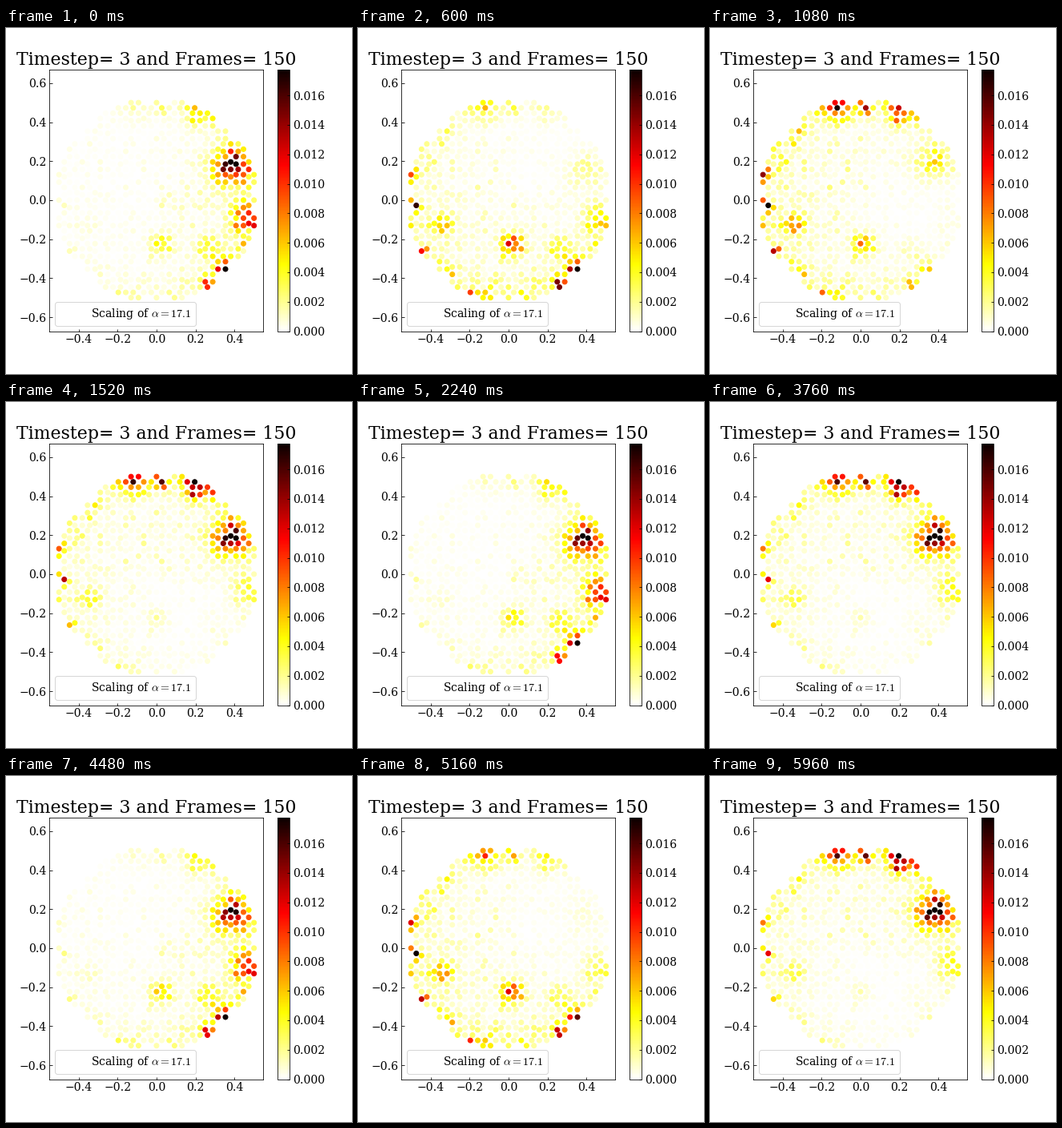
These frames come from a looping animation (432x432 px, 6 s). A matplotlib script:

```python
import numpy as np
import matplotlib.pyplot as plt
from matplotlib.animation import FuncAnimation

SIZE, FRAMES, STEP = 432, 150, 40
PERIOD = 2200          # ms for one trip around the rim
VMAX = 0.01775
CX, CY, SCALE = 187.92, 214.92, 243.49   # stage position of the disc

plt.rcParams.update({
    "font.family": "DejaVu Serif", "font.size": 14, "mathtext.fontset": "cm",
    "xtick.direction": "in", "ytick.direction": "in",
})


def octagonal_tiling():
    """Vertices of the eightfold tiling, cut and projected from Z^4."""
    r = np.arange(-8, 9)
    n = np.stack(np.meshgrid(r, r, r, r, indexing="ij"), -1).reshape(-1, 4)
    k = np.arange(4) * np.pi / 4
    axes = np.column_stack([np.cos(k), np.sin(k)])
    window = np.column_stack([np.cos(3 * k), np.sin(3 * k)])
    inside = np.abs(n @ window @ axes.T).max(1) < (1 + np.sqrt(2)) / 2
    p = n[inside] @ axes / (12 + 20 / np.sqrt(2))
    rim = (np.abs(p @ axes.T).max(1) < 0.5001) & (np.hypot(*p.T) < 0.518)
    return p[rim]


# Places where the wave piles up: x, y, spread, peak in thousandths
TRAPS = [
    (0.38, 0.18, 0.060, 24), (0.45, -0.09, 0.050, 10),
    (0.35, -0.35, 0.030, 22), (0.27, -0.42, 0.025, 16),
    (0.26, -0.24, 0.040, 7), (0.02, -0.23, 0.040, 13),
    (-0.33, -0.12, 0.035, 13), (-0.48, -0.03, 0.020, 24),
    (-0.50, 0.13, 0.015, 18), (-0.12, 0.48, 0.045, 14),
    (0.02, 0.48, 0.025, 20), (0.21, 0.46, 0.045, 18),
]


def split_density(xy):
    """Peak density of the inner sites and of the rim with its traps."""
    rng = np.random.default_rng(3)
    x, y = xy.T
    size = len(xy)
    depth = np.clip(0.5 - np.hypot(x, y), 0, None)
    bulk = 0.2 + rng.exponential(0.45, size)
    edge = (0.8 + rng.exponential(2.4, size)) * np.exp(-(depth / 0.06) ** 1.5)
    rough = rng.uniform(0.5, 1.1, size)
    for u, v, s, amp in TRAPS:
        edge += amp * rough * np.exp(-((x - u) ** 2 + (y - v) ** 2) / (2 * s * s))
    return bulk / 1000, edge / 1000


def arrival(xy):
    """Time in ms at which the clockwise wave peaks; it slows at the right."""
    turn = -np.arctan2(xy[:, 1], xy[:, 0])
    return PERIOD * turn / (2 * np.pi) - 90 + 200 * np.sin(turn)


sites = octagonal_tiling()
bulk, edge = split_density(sites)
when = arrival(sites)


def density(t):
    wave = np.cos(np.pi * (t - when) / PERIOD) ** 2
    return bulk * (0.25 + 0.75 * wave) + edge * (0.03 + 0.97 * wave)


def box(left, top, right, bottom):
    return [left / SIZE, 1 - bottom / SIZE,
            (right - left) / SIZE, (bottom - top) / SIZE]


LEFT, TOP, RIGHT, BOTTOM = 54, 51.84, 321.4, 378.6

fig = plt.figure(figsize=(6, 6), dpi=72, facecolor="white")
ax = fig.add_axes(box(LEFT, TOP, RIGHT, BOTTOM))
ax.set_xlim((LEFT - CX) / SCALE, (RIGHT - CX) / SCALE)
ax.set_ylim((CY - BOTTOM) / SCALE, (CY - TOP) / SCALE)
ax.set_xticks([-0.4, -0.2, 0, 0.2, 0.4])
ax.set_yticks([-0.6, -0.4, -0.2, 0, 0.2, 0.4, 0.6])
ax.set_title("Timestep= 3 and Frames= 150", fontsize=22)

dots = ax.scatter(*sites.T, c=density(0), s=36, linewidths=1,
                  cmap="hot_r", vmin=0, vmax=VMAX)
blank = ax.scatter([], [], color="white", label=r"Scaling of $\alpha=17.1$")
ax.legend(handles=[blank], loc="lower left", fontsize=14)

cax = fig.add_axes(box(338.58, TOP, 354.4, BOTTOM))
bar = fig.colorbar(dots, cax=cax)
bar.set_ticks(np.arange(0, 0.017, 0.002))
bar.ax.yaxis.set_major_formatter("{x:.3f}")


def draw(i):
    dots.set_array(density(i * STEP))
    return [dots]


anim = FuncAnimation(fig, draw, frames=FRAMES, interval=STEP,
                     repeat=True, repeat_delay=0, blit=False)
plt.show()
```
